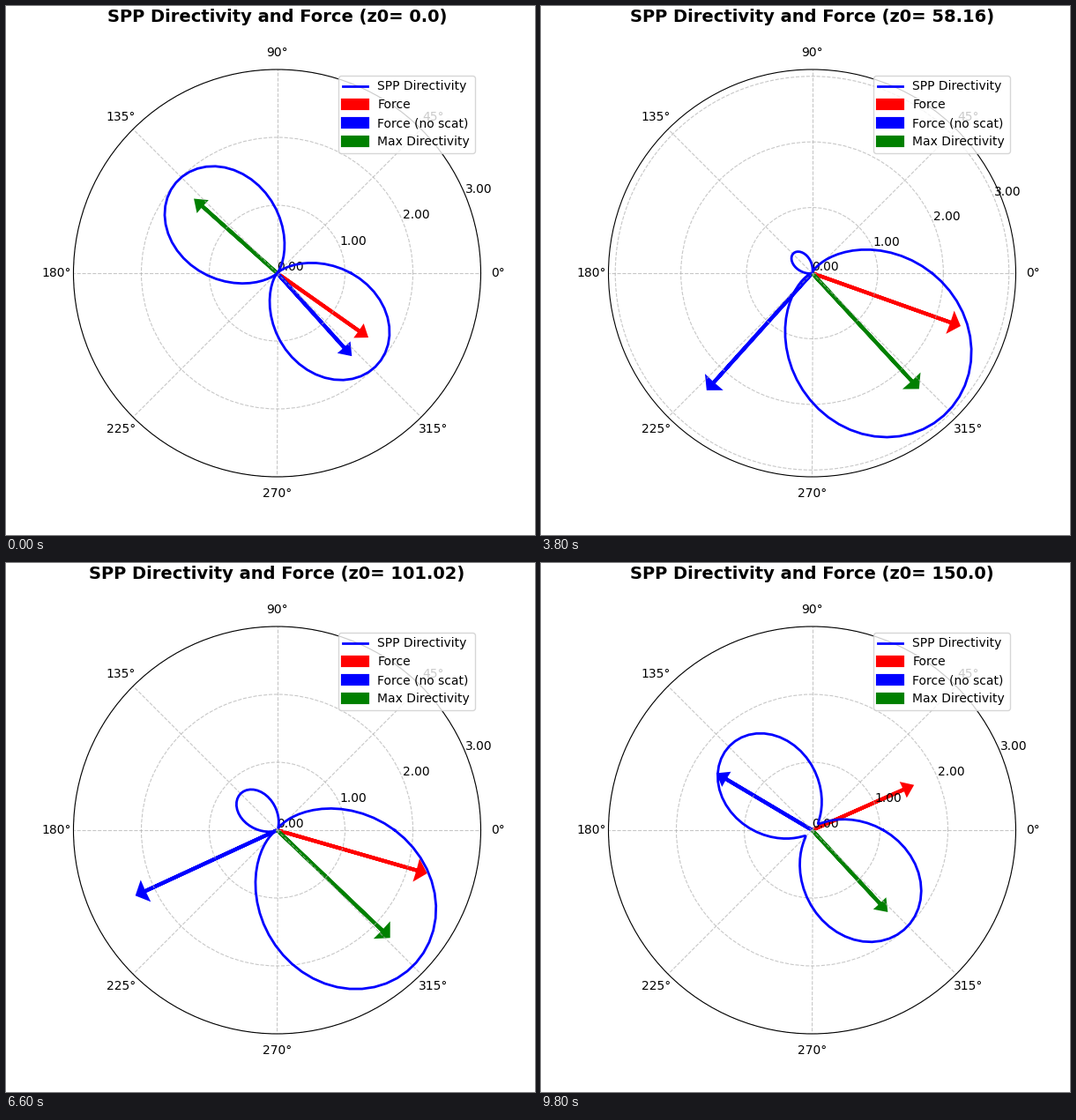
Write a matplotlib script that moves like this. It is 600 px wide and 600 px high and loops after 10 s.

```python
import numpy as np
import matplotlib.pyplot as plt
from matplotlib.animation import FuncAnimation

FRAMES = 50
heights = np.linspace(0, 150, FRAMES)
theta = np.linspace(0, 2 * np.pi, 100)

# Key (frame, degrees) pairs of the two force directions.
FORCE = [(0, -35.2), (6, -5.7), (14, -33.6), (19, -19.6), (28, -23.3),
         (39, -2.2), (49, 23.9)]
NO_SCAT = [(0, -48), (6, -37.4), (12, -47), (14, -87), (19, -132),
           (28, -141.4), (39, -176), (49, -210.7)]


def direction(keys, n):
    """Smooth (cubic Hermite) angle in radians at frame n."""
    x, y = np.array(keys, float).T
    slope = np.gradient(y, x)
    k = min(np.searchsorted(x, n, side="right") - 1, len(x) - 2)
    h = x[k + 1] - x[k]
    t = (n - x[k]) / h
    deg = (y[k] + (y[k + 1] - y[k]) * t * t * (3 - 2 * t)
           + h * t * (1 - t) * (slope[k] * (1 - t) - slope[k + 1] * t))
    return np.radians(deg) % (2 * np.pi)


def directivity(z):
    """Dipole radiation pattern, normalised to a mean of one."""
    along = np.tanh((z - 50.8) / 12)
    across = -0.045 * np.cos(np.pi * z / 200) ** 2
    vertical = 0.185 * np.sin(np.pi * z / 155) * (1 + np.tanh((z - 45) / 25))
    u = theta + np.pi / 4
    field = vertical + along * np.cos(u) + across * np.sin(u)
    power = field ** 2 + 0.075 * (z / 150) ** 3
    return power / power[:-1].mean()


fig = plt.figure(figsize=(6, 6), dpi=100)
ax = fig.add_subplot(projection="polar")


def arrow(angle, length, color, label):
    ax.arrow(angle, 0, 0, length, head_width=0.1, head_length=0.1,
             length_includes_head=True, lw=3, fc=color, ec=color, label=label)


def draw(n):
    z = float(heights[n])
    d = directivity(z)
    peak = d.max()
    ax.clear()
    ax.plot(theta, d, color="blue", lw=2, label="SPP Directivity")
    arrow(direction(FORCE, n), 0.8 * peak, "red", "Force")
    arrow(direction(NO_SCAT, n), 0.8 * peak, "blue", "Force (no scat)")
    arrow(theta[d.argmax()], 0.8 * peak, "green", "Max Directivity")
    ax.set_yticks(range(4))
    ax.yaxis.set_major_formatter("{x:.2f}")
    ax.set_xlim(0, 2 * np.pi)
    ax.set_ylim(0, max(3, 1.05 * peak))
    ax.grid(True, linestyle="--", alpha=0.7)
    ax.legend(loc="upper right")
    ax.set_title(f"SPP Directivity and Force (z0= {round(z, 2)})",
                 fontsize=14, fontweight="bold", pad=20)


anim = FuncAnimation(fig, draw, frames=FRAMES, interval=200,
                     init_func=lambda: draw(0), repeat=True)
plt.show()
```
